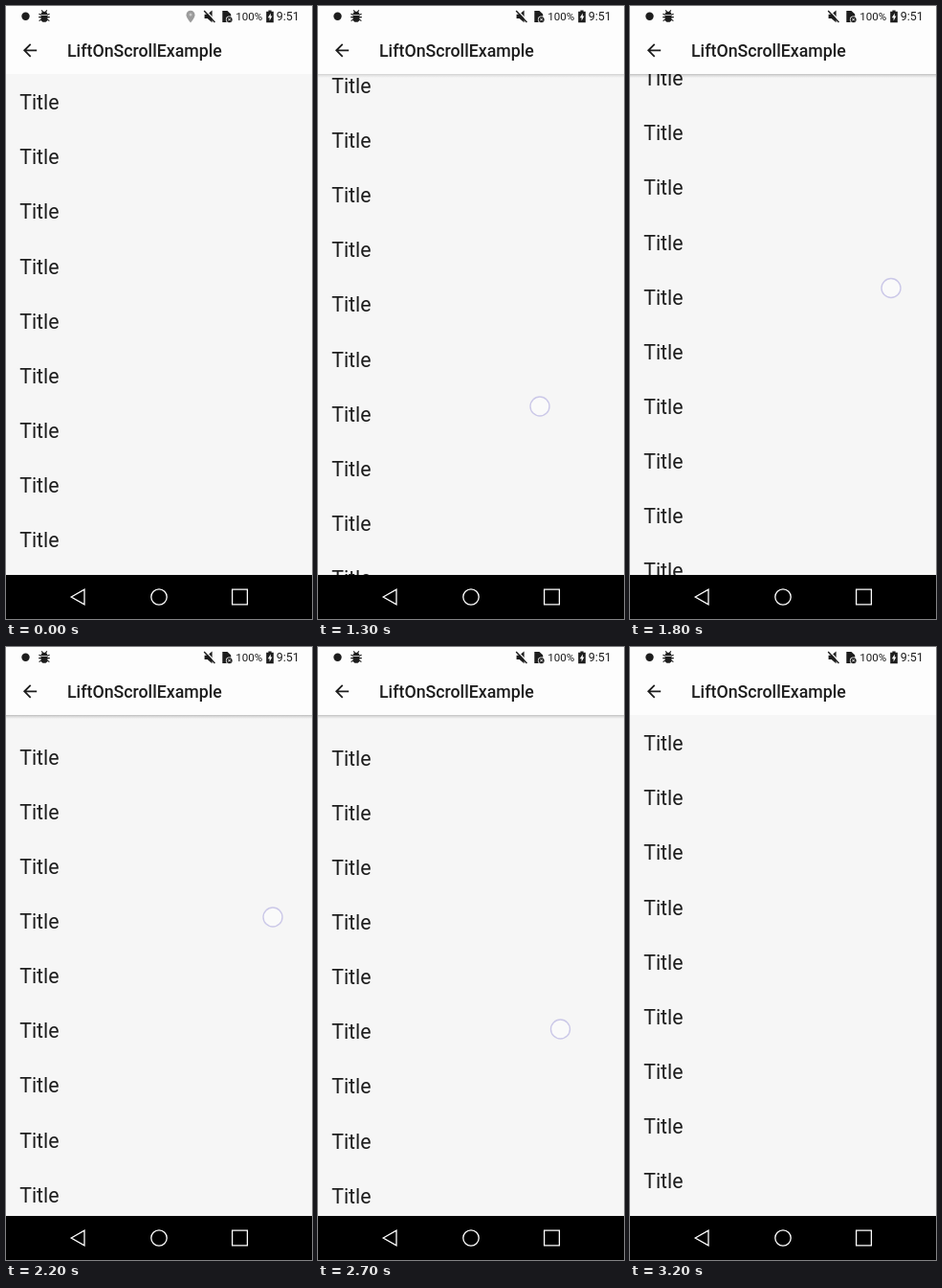
These frames come from a looping animation (320x640 px, 3.3 s). An HTML page with a canvas:

```html
<!DOCTYPE html>
<html lang="en">
<head>
<meta charset="utf-8">
<title>Lift on scroll</title>
<style>
  html, body { margin: 0; width: 100%; height: 100%; overflow: hidden; background: #f6f6f6; }
  canvas { display: block; width: 320px; height: 640px; }
</style>
</head>
<body>
<canvas id="stage"></canvas>
<script>
const WIDTH = 320, HEIGHT = 640, LOOP = 3300, STEP = 100;
const BAR_BOTTOM = 71, NAV_TOP = 594, ROW = 57.14;
const BAR = '#fdfdfd', LIST = '#f6f6f6', INK = '#1d1d1d';

// Keyframes are [time, value].
const touchX = [[1100, 228], [1300, 232], [1500, 246], [1800, 273], [2000, 279], [2200, 279],
  [2450, 268], [2700, 253.5], [3000, 247]];
const touchY = [[1100, 438], [1300, 418], [1500, 370], [1800, 294.5], [2000, 277], [2200, 282],
  [2450, 330], [2700, 399], [2900, 446], [3000, 460]];
const scrollY = [[1100, 0], [1300, 17.4], [1500, 65], [1800, 139.3], [2000, 158], [2200, 157],
  [2450, 109], [2700, 41.7], [2900, 0]];
const lift = [[1100, 0], [1200, 0.4], [1400, 1], [2900, 1], [3100, 0]];

const canvas = document.getElementById('stage');
const ctx = canvas.getContext('2d');
const ratio = window.devicePixelRatio || 1;
canvas.width = WIDTH * ratio;
canvas.height = HEIGHT * ratio;

function slope(keys, i) {
  const a = keys[i - 1], b = keys[i + 1];
  return a && b ? (b[1] - a[1]) / (b[0] - a[0]) : 0;
}

// Cubic Hermite interpolation through the keyframes.
function smooth(keys, t) {
  if (t <= keys[0][0]) return keys[0][1];
  const i = keys.findIndex(key => key[0] > t) - 1;
  if (i < 0) return keys[keys.length - 1][1];
  const [t0, a] = keys[i], [t1, b] = keys[i + 1];
  const span = t1 - t0, u = (t - t0) / span;
  const u2 = u * u, u3 = u2 * u;
  return (2 * u3 - 3 * u2 + 1) * a + (3 * u2 - 2 * u3) * b
    + span * ((u3 - 2 * u2 + u) * slope(keys, i) + (u3 - u2) * slope(keys, i + 1));
}

function rect(x, y, w, h, color) {
  ctx.fillStyle = color;
  ctx.fillRect(x, y, w, h);
}

function circle(x, y, r, fill, stroke, width) {
  ctx.beginPath();
  ctx.arc(x, y, r, 0, Math.PI * 2);
  if (fill) { ctx.fillStyle = fill; ctx.fill(); }
  if (stroke) { ctx.strokeStyle = stroke; ctx.lineWidth = width; ctx.stroke(); }
}

function fillPath(d, color) {
  ctx.fillStyle = color;
  ctx.fill(new Path2D(d));
}

function strokePath(d, color, width) {
  ctx.strokeStyle = color;
  ctx.lineWidth = width;
  ctx.stroke(new Path2D(d));
}

function text(label, x, y, size, weight = 400) {
  ctx.font = `${weight} ${size}px Roboto, sans-serif`;
  ctx.fillStyle = INK;
  ctx.fillText(label, x, y);
}

function drawList(offset) {
  rect(0, BAR_BOTTOM, WIDTH, NAV_TOP - BAR_BOTTOM, LIST);
  ctx.save();
  ctx.beginPath();
  ctx.rect(0, BAR_BOTTOM, WIDTH, NAV_TOP - BAR_BOTTOM);
  ctx.clip();
  for (let i = 0; i < 14; i++) text('Title', 14.2, 108.2 + i * ROW - offset, 21.33);
  ctx.restore();
}

function drawShadow(amount) {
  if (amount <= 0) return;
  const fade = ctx.createLinearGradient(0, BAR_BOTTOM - 1, 0, BAR_BOTTOM + 4);
  fade.addColorStop(0, `rgba(0,0,0,${0.27 * amount})`);
  fade.addColorStop(0.5, `rgba(0,0,0,${0.1 * amount})`);
  fade.addColorStop(1, 'rgba(0,0,0,0)');
  rect(0, BAR_BOTTOM - 0.5, WIDTH, 4.5, fade);
}

function drawStatus(showPin) {
  circle(20.5, 10.8, 4.2, INK);

  // Bug
  fillPath('M36.6 9.2a3.4 3.4 0 0 1 6.8 0z M36.6 10h6.8v3.4a3.4 3.4 0 0 1-6.8 0z', INK);
  strokePath('M37.2 4.4l1.6 2M42.8 4.4l-1.6 2M34.4 8.2l2.6 1M45.6 8.2l-2.6 1'
    + 'M34.2 11.6h11.6M34.6 15.4l2.6-1.4M45.4 15.4l-2.6-1.4', INK, 1.1);

  if (showPin) {
    fillPath('M193 17.4c-3-3.6-4.5-6-4.5-8.2a4.5 4.5 0 0 1 9 0c0 2.2-1.5 4.6-4.5 8.2z', '#9b9b9b');
    circle(193, 9.1, 1.5, '#c9c9c9');
  }

  // Muted speaker
  fillPath('M207.6 8.8h3l5-4.2v12.6l-5-4.2h-3z', INK);
  strokePath('M208.3 4.2l11 11.6', BAR, 1.3);
  strokePath('M207.2 5l11.2 12', INK, 1.4);

  // Missing SIM card
  fillPath('M226.3 5h5.2l3.7 3.6v8.4h-8.9z', INK);
  circle(233.6, 14.2, 3.7, BAR);
  circle(233.6, 14.2, 3, INK);
  strokePath('M232.3 12.9l2.6 2.6M234.9 12.9l-2.6 2.6', BAR, 0.9);

  text('100%', 240.2, 15.2, 11.55);
  fillPath('M274.4 4.6h3.2v1.2h2.2v11.4h-7.6V5.8h2.2z', INK);
  fillPath('M276.8 7.4l-3 4.8h1.8v3.2l2.8-4.8h-1.6z', BAR);
  text('9:51', 282.8, 15.4, 12.44);
}

function drawAppBar(showPin) {
  rect(0, 0, WIDTH, BAR_BOTTOM, BAR);
  drawStatus(showPin);
  ctx.save();
  ctx.translate(14.4, 35.6);
  ctx.scale(0.889, 0.889);
  fillPath('M20 11H7.83l5.59-5.59L12 4l-8 8 8 8 1.41-1.41L7.83 13H20z', INK);
  ctx.restore();
  text('LiftOnScrollExample', 64, 53, 17.78, 500);
}

function drawNavigation() {
  rect(0, NAV_TOP, WIDTH, HEIGHT - NAV_TOP, '#000');
  strokePath('M68.2 617L82 609.2v15.6z', '#fff', 1.3);
  circle(160, 617, 8.2, null, '#fff', 1.3);
  strokePath('M236.6 609.1h15.8v15.8h-15.8z', '#fff', 1.3);
}

function draw(t) {
  ctx.setTransform(ratio, 0, 0, ratio, 0, 0);
  drawList(smooth(scrollY, t));
  drawShadow(smooth(lift, t));
  drawAppBar(t < 900);
  if (t >= 1100 && t <= 3000) {
    circle(smooth(touchX, t), smooth(touchY, t), 10, '#fafafa', '#cbc8e8', 1.4);
  }
  drawNavigation();
}

const start = performance.now();
function tick() {
  const t = (performance.now() - start) % LOOP;
  draw(Math.floor(t / STEP) * STEP);
  requestAnimationFrame(tick);
}
tick();
</script>
</body>
</html>
```
